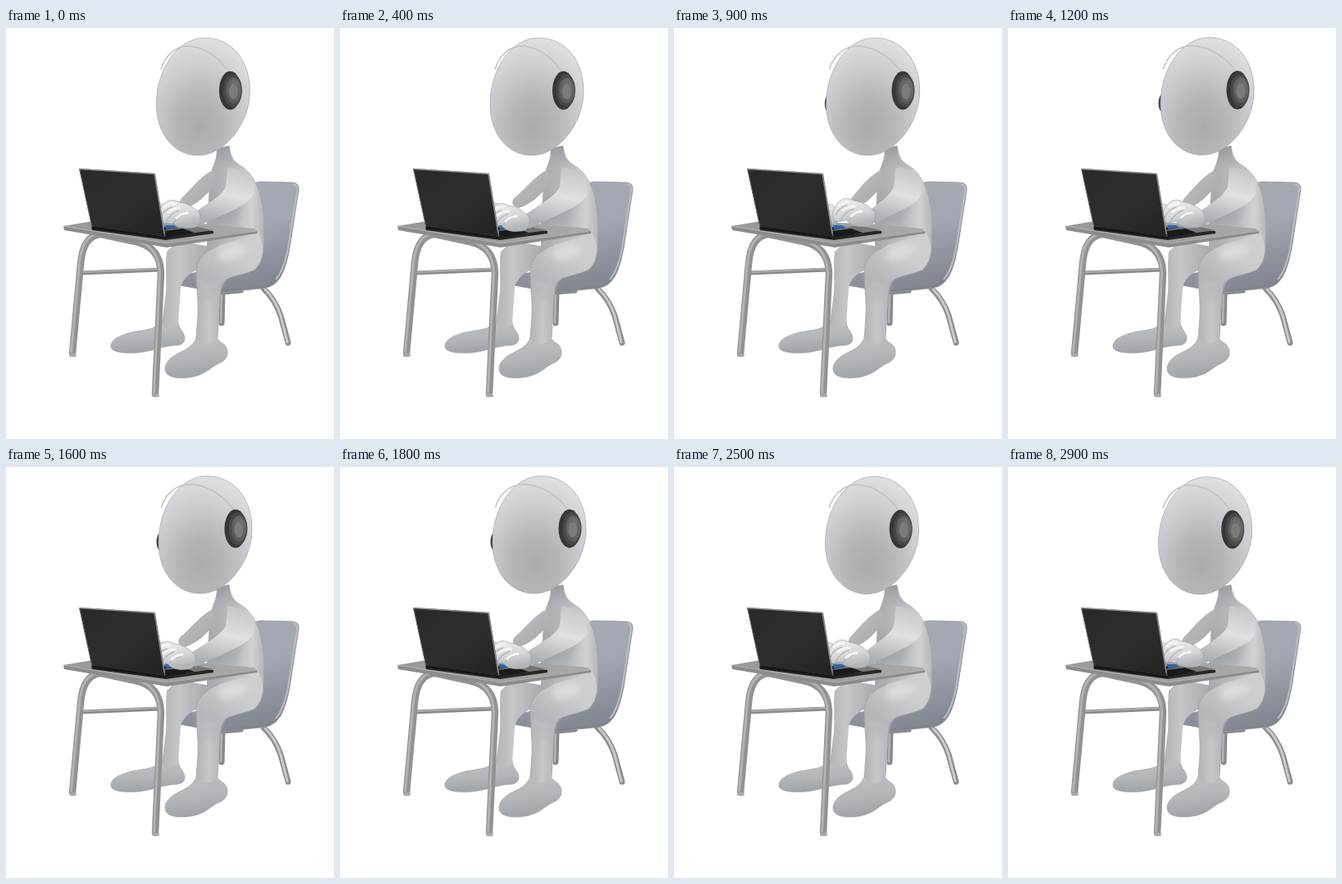
These frames come from a looping animation (400x500 px, 3 s). An HTML page:

```html
<!DOCTYPE html>
<html lang="en">
<head>
<meta charset="utf-8">
<title>Typing at a desk</title>
<style>
html, body { margin: 0; width: 100%; height: 100%; overflow: hidden; background: #fff; }
svg { display: block; width: 400px; height: 500px; }
.skin { stroke: #a2a4a8; stroke-width: .7; }
.line { fill: none; stroke-linecap: round; stroke-linejoin: round; }
.glow { filter: url(#soft); }
</style>
</head>
<body>
<svg viewBox="0 0 400 500">
<defs>
  <radialGradient id="head" cx=".46" cy=".76" r=".8">
    <stop offset="0" stop-color="#a9abac"/><stop offset=".3" stop-color="#b3b5b7"/>
    <stop offset=".65" stop-color="#cbcdd0"/><stop offset="1" stop-color="#e0e2e4"/>
  </radialGradient>
  <linearGradient id="torso">
    <stop offset="0" stop-color="#a6a9ac"/><stop offset=".5" stop-color="#bcbec1"/>
    <stop offset=".8" stop-color="#cfd1d3"/><stop offset="1" stop-color="#b3b5b9"/>
  </linearGradient>
  <linearGradient id="neck" x2="0" y2="1">
    <stop offset="0" stop-color="#8f9297" stop-opacity=".8"/><stop offset="1" stop-color="#a0a3a8" stop-opacity="0"/>
  </linearGradient>
  <linearGradient id="arm" x1=".8" y1="0" x2=".55" y2="1">
    <stop offset="0" stop-color="#c3c5c8"/><stop offset=".5" stop-color="#dfe0e2"/><stop offset="1" stop-color="#acafb3"/>
  </linearGradient>
  <linearGradient id="far" x2="1" y2="1">
    <stop offset="0" stop-color="#c0c2c5"/><stop offset="1" stop-color="#a3a6aa"/>
  </linearGradient>
  <linearGradient id="hand" x2=".3" y2="1">
    <stop offset="0" stop-color="#eeeff0"/><stop offset=".6" stop-color="#d6d7da"/><stop offset="1" stop-color="#b2b5b9"/>
  </linearGradient>
  <linearGradient id="leg">
    <stop offset="0" stop-color="#b2b4b7"/><stop offset=".35" stop-color="#c4c6c8"/><stop offset="1" stop-color="#a5a8ac"/>
  </linearGradient>
  <linearGradient id="thigh" x1="1" y1="0" x2="0" y2=".9">
    <stop offset="0" stop-color="#cfd0d2"/><stop offset=".45" stop-color="#c9cbcd"/><stop offset="1" stop-color="#b0b3b6"/>
  </linearGradient>
  <linearGradient id="foot" x2=".2" y2="1">
    <stop offset="0" stop-color="#bfc1c4"/><stop offset=".55" stop-color="#b5b8bb"/><stop offset="1" stop-color="#a1a4a8"/>
  </linearGradient>
  <linearGradient id="chair" x1="0" y1="0" x2=".25" y2="1">
    <stop offset="0" stop-color="#a8abb3"/><stop offset=".5" stop-color="#a3a7b0"/><stop offset="1" stop-color="#848892"/>
  </linearGradient>
  <linearGradient id="desk">
    <stop offset="0" stop-color="#989898"/><stop offset=".6" stop-color="#a0a0a0"/><stop offset="1" stop-color="#acabab"/>
  </linearGradient>
  <linearGradient id="lid" x2="1" y2="1">
    <stop offset="0" stop-color="#292929"/><stop offset=".5" stop-color="#2e2e2e"/><stop offset="1" stop-color="#232323"/>
  </linearGradient>
  <linearGradient id="band">
    <stop offset="0" stop-color="#6a6a6a"/><stop offset=".35" stop-color="#a6a6a6"/><stop offset="1" stop-color="#7a7a7a"/>
  </linearGradient>
  <radialGradient id="pad" cx=".55" cy=".45" r=".6">
    <stop offset="0" stop-color="#858585"/><stop offset=".5" stop-color="#6c6c6c"/><stop offset="1" stop-color="#505050"/>
  </radialGradient>
  <filter id="soft" x="-50%" y="-50%" width="200%" height="200%"><feGaussianBlur stdDeviation="4"/></filter>
</defs>

<g id="seat">
  <g class="line">
    <path d="M264 320L263 359" stroke="#888" stroke-width="7"/>
    <path d="M263 322L262 358" stroke="#b4b4b4" stroke-width="2.5"/>
    <path d="M264 322L287 320" stroke="#8a8a8a" stroke-width="5"/>
    <path d="M314 317Q328 330 335 350L344 383" stroke="#8d8d8d" stroke-width="7"/>
    <path d="M316 318Q329 331 335 350L343 382" stroke="#cacaca" stroke-width="3"/>
  </g>
  <path d="M212 301L235 297L306 290L303 190Q305 187 311 187L350 188Q358 189 357 197L346 268Q340 300 330 309Q324 316 310 317L261 322L212 313Z" fill="url(#chair)" stroke="#8e929a" stroke-width=".8"/>
  <path d="M351 190Q356 192 355 198L344 268Q339 294 329 306" class="line" stroke="#b9bcc3" stroke-width="2"/>
  <path d="M262 320L309 315Q322 314 329 307" class="line" stroke="#7f848d" stroke-width="3"/>
</g>

<g id="body">
  <path class="skin" fill="url(#torso)" d="M257 148C258 161 251 169 249 182C248 200 247 215 245 240L246 292L303 295C315 283 316 250 314 228C312 202 304 179 287 168C277 162 272 158 272 144Z"/>
  <path fill="url(#neck)" d="M257 146Q259 160 251 172L290 172Q275 161 272 143Z"/>
  <path class="glow" fill="#858a90" opacity=".3" d="M253 203L290 212L280 240L248 237Z"/>
</g>

<g id="legs">
  <path class="skin" fill="url(#foot)" d="M190 357C183 367 170 367 154 370C137 374 127 380 128 388C129 395 145 396 161 395C180 393 193 386 209 386C218 385 220 378 216 371C213 366 210 363 210 356Z"/>
  <path fill="url(#leg)" d="M196 272C194 288 196 304 195 322L190 359Q200 372 210 360L213 316Q216 301 236 293L249 266L210 259Z"/>
  <path class="skin" fill="url(#foot)" d="M233 374C229 389 216 392 206 398C196 404 192 412 195 419C199 427 217 427 230 424C246 420 251 411 262 407C272 402 272 391 266 385C260 381 257 379 257 373Z"/>
  <path fill="url(#leg)" d="M232 290C232 315 235 332 234 350L232 377Q245 392 258 377L261 328Q262 308 276 300L262 274Z"/>
  <path fill="url(#thigh)" d="M308 250C319 270 312 288 301 295C289 301 272 301 265 309Q248 314 233 304C229 284 242 271 261 264Z"/>
  <path class="glow" fill="#e3e4e5" opacity=".7" d="M262 268Q282 259 296 268Q288 280 266 283Q254 281 262 268Z"/>
  <path class="glow" fill="#b6b8bb" opacity=".7" d="M234 298L264 302L258 330L238 328Z"/>
  <path class="line" stroke="#a2a5a9" stroke-width=".8" d="M314 250C316 275 311 290 301 295C289 301 272 301 265 309Q262 314 261 328L258 376M232 377L234 350C235 332 232 315 232 298C231 283 242 272 259 265"/>
</g>

<g id="table">
  <g class="line">
    <path d="M92 298L187 294" stroke="#8a8a8a" stroke-width="5"/>
    <path d="M94 297L185 293" stroke="#acacac" stroke-width="2"/>
    <path d="M81 396L91 287Q94 252 116 251L158 260Q188 266 189 298L182 445" stroke="#929292" stroke-width="8.5"/>
    <path d="M79.5 394L89.5 287Q92.500 251 116 249.500L158 258.500Q186 265 187.500 298L180.500 443" stroke="#b2b2b2" stroke-width="3"/>
    <path d="M79 398H84M180 447H185" stroke="#aaa" stroke-width="4"/>
  </g>
  <path fill="url(#desk)" d="M70 241L105 235L238 238L303 244L306 248L196 263Z"/>
  <path fill="#8c8c8c" d="M70 241L196 262L306 247V250L196 267L71 246Z"/>
  <path class="line" stroke="#b0b0b0" stroke-width="1" d="M71 241L196 262L305 247"/>
</g>

<g id="base">
  <path fill="#262626" d="M104 242L192 242L253 247V250L195 258L105 246Z"/>
  <path fill="#777" d="M193 246L224 240L253 246L195 254Z"/>
  <path fill="#1a1a1a" d="M193 247L216 244L230 249L195 255Z"/>
  <path fill="#2768b0" d="M194 240L205 240L210 243L195 245Z"/>
</g>

<path id="farArm" fill="url(#far)"/>
<path id="farHand" class="skin" fill="url(#hand)" d="M181 222Q186 210 194 216Q200 222 200 233Q197 240 188 238Z"/>
<path id="nearArm" fill="url(#arm)"/>
<g id="nearHand">
  <path class="skin" fill="url(#hand)" d="M236 225C229 218 221 213 211 212C203 207 195 210 191 216C185 222 184 231 188 236C193 240 199 235 203 236C209 244 218 244 227 243C236 243 239 234 236 225Z"/>
  <g class="line" stroke="#acafb3" stroke-width="1.2">
    <path d="M189 230Q193 220 203 218M195 236Q200 226 211 222M204 238Q208 230 218 227"/>
  </g>
  <g class="line" stroke="#f4f4f5" stroke-width="3">
    <path d="M193 218Q198 213 205 214M198 224Q204 219 212 219M208 231Q213 226 221 225"/>
  </g>
</g>

<g id="screen">
  <path fill="url(#lid)" stroke="#6e6e6e" stroke-width="1" d="M89.500 171.500L181.500 177.500L194 254L105 243Z"/>
  <path class="line" stroke="#8b8b8b" stroke-width="1.500" d="M90 171.500L181 177.500L193 250"/>
  <path class="line" stroke="#151515" stroke-width="2.500" d="M106 243L194 255"/>
</g>

<ellipse id="farCup" rx="5" ry="11" fill="#3c3c3c"/>
<g id="skull">
  <path class="skin" fill="url(#head)" d="M243 12C277 12 299 41 298 79C297 117 267 155 235 155C205 155 184 128 184 93C184 50 210 12 243 12Z"/>
</g>
<path id="band" fill="url(#band)" stroke="#777" stroke-width=".8"/>
<path id="shine" class="line" stroke="#c2c2c2" stroke-width="1.500"/>
<g id="cup">
  <ellipse cx="-1" rx="13.500" ry="23.500" fill="#373737"/>
  <ellipse cx="2" rx="11.500" ry="20" fill="#484848"/>
  <ellipse cx="3" rx="9.500" ry="16" fill="url(#pad)"/>
  <ellipse cx="3" cy="1" rx="6" ry="10" fill="#7b7b7b" stroke="#626262"/>
</g>
</svg>
<script>
const LOOP = 3000, STEP = 100;
const $ = id => document.getElementById(id);

// time, head turn, head lift, hand x, hand y
const KEYS = [
  [0, .12, 0, 0, 0],
  [400, 0, 0, -6, 4],
  [900, .87, 0, 8, -2],
  [1600, 1, 1, -6, 3],
  [2100, .95, 1, 2, 0],
  [2500, .5, .4, 2, 1],
  [2900, .15, 0, 1, 0]
];

// Key number i of the endless loop
function keyAt(i) {
  const n = KEYS.length, lap = Math.floor(i / n);
  const [time, ...pose] = KEYS[i - lap * n];
  return { time: time + lap * LOOP, pose };
}

// Smooth curve through the keys, without a stop at each one
function poseAt(t) {
  const i = KEYS.findLastIndex(k => k[0] <= t);
  const [p, a, b, n] = [i - 1, i, i + 1, i + 2].map(keyAt);
  const span = b.time - a.time, u = (t - a.time) / span, v = 1 - u;
  return a.pose.map((from, j) => {
    const to = b.pose[j];
    const out = (to - p.pose[j]) / (b.time - p.time) * span;
    const into = (n.pose[j] - from) / (n.time - a.time) * span;
    return from * v * v * (1 + 2 * u) + to * u * u * (1 + 2 * v) + out * u * v * v - into * u * u * v;
  });
}

const move = (id, x, y) => $(id).setAttribute('transform', `translate(${x} ${y})`);
const shape = (id, d) => $(id).setAttribute('d', d);

function drawHead(turn, lift) {
  const cupX = 273.5 + turn * 7.4, y = -lift, mid = 222 + turn * 3;
  move('skull', turn * 3 - 1, y);
  move('cup', cupX, 76 + y);
  move('farCup', 191 - turn * 2.5, 92 + y);
  const left = 189 + turn * .5;
  const rise = top => `C${left + 4} ${top + 15 + y} ${left + 15} ${top + y} ${mid} ${top + y}`;
  const fall = top => `C${mid + 22} ${top + 1 + y} ${cupX - 13} ${top + 15 + y} ${cupX + 22 - top} ${58 + y}`;
  shape('band', `M${left - 1} ${54 + y}${rise(19)}${fall(19)}L${cupX - 4} ${59 + y}` +
    `C${cupX - 15} ${40 + y} ${mid + 20} ${27 + y} ${mid} ${26 + y}` +
    `C${left + 17} ${25 + y} ${left + 6} ${37 + y} ${left + 1} ${54 + y}Z`);
  shape('shine', `M${left} ${50 + y}${rise(22)}${fall(22)}`);
}

function drawArms(x, y) {
  move('nearHand', x, y);
  move('farHand', Math.max(0, x - 3) * .2, -y * .3);
  shape('nearArm', `M270 170C288 168 303 184 302 200C300 215 270 224 ${237 + x} ${240 + y}` +
    `Q${229 + x} ${234 + y} ${232 + x} ${223 + y}C${246 + x * .6} ${213 + y * .6} 264 204 268 193Z`);
  const hand = 214 + x * .3;
  shape('farArm', `M252 173C236 181 225 197 ${hand} 207Q${hand - 6} 216 ${hand + 6} 219` +
    'C235 214 244 202 253 194Q258 183 252 173Z');
}

function draw(now) {
  const t = Math.floor(now % LOOP / STEP) * STEP;
  const [turn, lift, x, y] = poseAt(t);
  drawHead(turn, lift);
  drawArms(x, y);
}

function tick() {
  draw(performance.now());
  requestAnimationFrame(tick);
}
tick();
</script>
</body>
</html>
```
